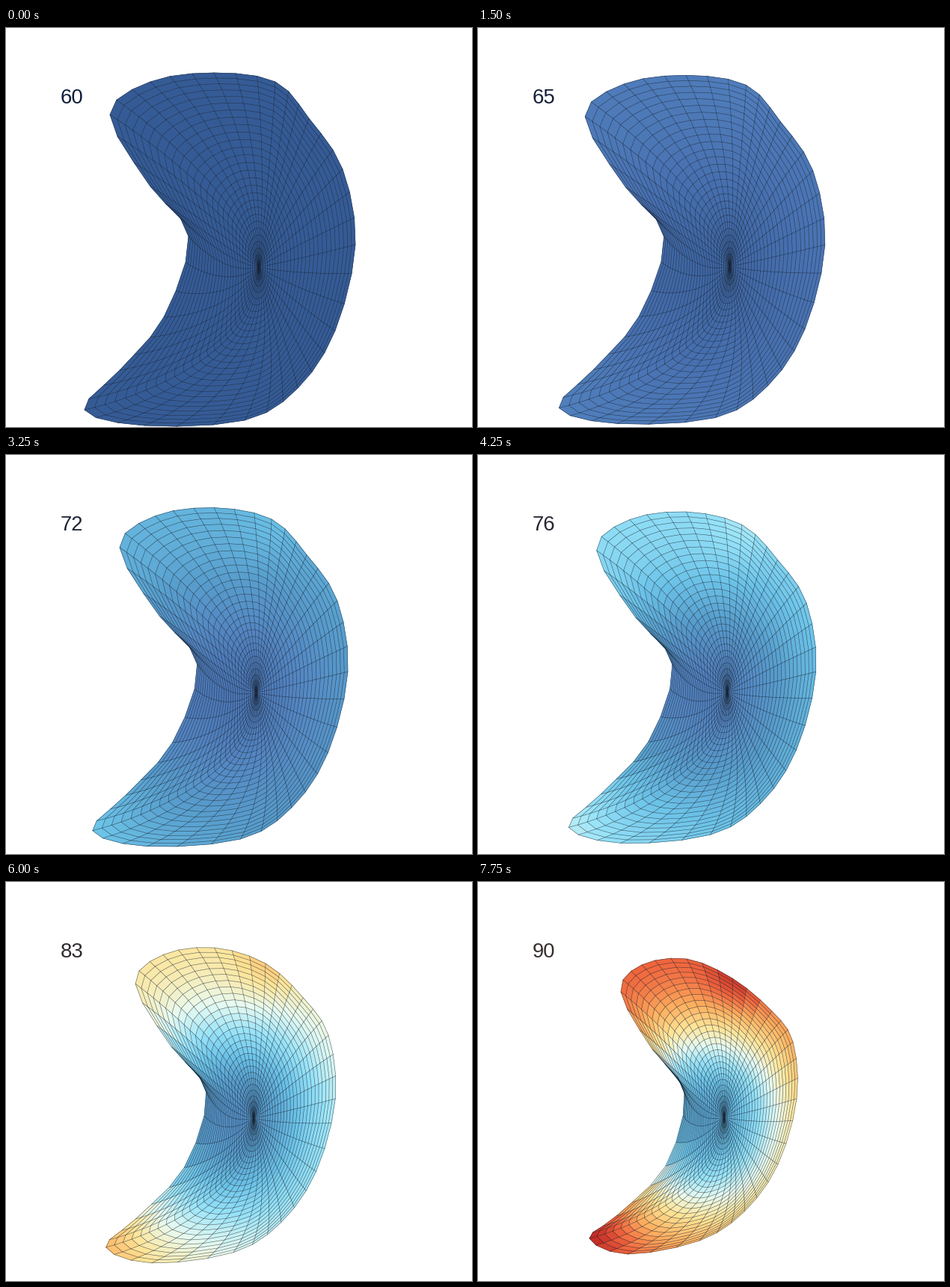
Recreate the animation shown at these times as a matplotlib script. Size 623x534 px, loop 8500 ms.

```python
import numpy as np
import matplotlib.pyplot as plt
from matplotlib.animation import FuncAnimation
from matplotlib.collections import LineCollection, PolyCollection
from matplotlib.colors import LinearSegmentedColormap

W, H, DPI = 623, 534, 100
FRAMES, STEP = 34, 250
FIRST, LAST = 60, 90
RINGS, SPOKES, PER_KEY = 28, 48, 3

# Key points of the silhouette, clockwise from the upper left tip
START_KEYS = [
    (139, 116), (193, 72), (278, 60), (360, 72), (405, 121), (450, 189),
    (467, 290), (440, 405), (390, 482), (319, 525), (185, 532), (105, 511),
    (152, 458), (211, 387), (244, 279), (193, 212)]
END_KEYS = [
    (191, 147), (219, 111), (279, 103), (340, 129), (393, 173), (421, 214),
    (426, 290), (401, 378), (356, 441), (296, 480), (200, 498), (149, 477),
    (185, 447), (251, 380), (276, 282), (233, 224)]

CMAP = LinearSegmentedColormap.from_list("heat", [
    "#355b96", "#4870b0", "#5486c2", "#589ecd", "#6cc3e8", "#98e3f8",
    "#e8faf0", "#fee496", "#fdaf5f", "#ee623c", "#c32d26"], N=512)
INK_START, INK_END = np.array([(16, 28, 58), (55, 45, 45)]) / 255


def px(n):
    return n * 72 / DPI


def smooth_loop(keys):
    """Closed Catmull-Rom curve with PER_KEY points for each key point."""
    p = np.array(keys, float)[:, None]
    nxt = np.roll(p, -1, axis=0)
    m0 = (nxt - np.roll(p, 1, axis=0)) / 2
    m1 = np.roll(m0, -1, axis=0)
    s = (np.arange(PER_KEY) / PER_KEY)[None, :, None]
    rise = s * s * (3 - 2 * s)
    curve = p + (nxt - p) * rise + m0 * s * (1 - s) ** 2 - m1 * s * s * (1 - s)
    return curve.reshape(-1, 2)


def bump(pts, center, radius):
    """Bell of height 1; radius is a number or an (x, y) pair."""
    return np.exp(-(((pts - center) / radius) ** 2).sum(axis=-1))


START, END = smooth_loop(START_KEYS), smooth_loop(END_KEYS)

# The hollow side moves almost evenly, the rest speeds up
BEND = 0.65 - 0.5 * bump(START, (235, 280), 110)[:, None]

# Direction in which each spoke leaves the pole
PHI = 2 * np.pi * (np.arange(SPOKES) - 18.5) / SPOKES

U = np.linspace(0, 1, RINGS + 1)[:, None, None]
RHO, BLEND = np.sin(U * np.pi / 2), U ** 1.7


def grid(t):
    """Mesh points, indexed by ring and spoke (first spoke repeated)."""
    rim = START + (END - START) * t * (1 - BEND * (1 - t))
    pole = np.array([338 - 9 * t, 320 - 5 * t])
    oval = np.column_stack([(50 - 9 * t) * np.cos(PHI), (150 - 25 * t) * np.sin(PHI)])
    pts = pole + RHO * (oval + (rim - pole - oval) * BLEND)
    return np.concatenate([pts, pts[:, :1]], axis=1)


def cells(g):
    return np.stack([g[:-1, :-1], g[1:, :-1], g[1:, 1:], g[:-1, 1:]], axis=2)


def heat(pts):
    """Final level: a cool basin, with hot spots at the top and the tail tip."""
    basin = np.where(pts[..., 1] < 312,
                     bump(pts, (305, 312), (120, 120)),
                     bump(pts, (305, 312), (120, 140)))
    return (0.92 - 0.6 * basin + 0.12 * bump(pts, (352, 125), 45)
            + 0.12 * bump(pts, (145, 472), 50))


LEVEL = heat(cells(grid(1)).mean(axis=2))

fig = plt.figure(figsize=(W / DPI, H / DPI), dpi=DPI, facecolor="white")
ax = fig.add_axes([0, 0, 1, 1])
ax.set_xlim(0, W)
ax.set_ylim(H, 0)
ax.axis("off")

faces = PolyCollection([], linewidths=px(0.7))
lines = LineCollection([], colors=[(0.08, 0.12, 0.17, 0.72)], linewidths=px(0.55))
ax.add_collection(faces, autolim=False)
ax.add_collection(lines, autolim=False)
label = ax.text(73, 101, "", family="Liberation Sans", fontsize=px(27.5),
                ha="left", va="baseline")


def draw(i):
    n = min(max(FIRST + i - 1, FIRST), LAST)
    t = (n - FIRST) / (LAST - FIRST)
    g = grid(t)
    colors = CMAP(t * LEVEL).reshape(-1, 4)
    faces.set_verts(cells(g).reshape(-1, 4, 2))
    faces.set_facecolor(colors)
    faces.set_edgecolor(colors)
    lines.set_segments(list(g[1:]) + list(g[:, :-1].swapaxes(0, 1)))
    label.set_text(str(n))
    label.set_color(INK_START + (INK_END - INK_START) * t)
    return faces, lines, label


anim = FuncAnimation(fig, draw, frames=FRAMES, interval=STEP,
                     init_func=lambda: draw(0), repeat=True, repeat_delay=0)
plt.show()
```
